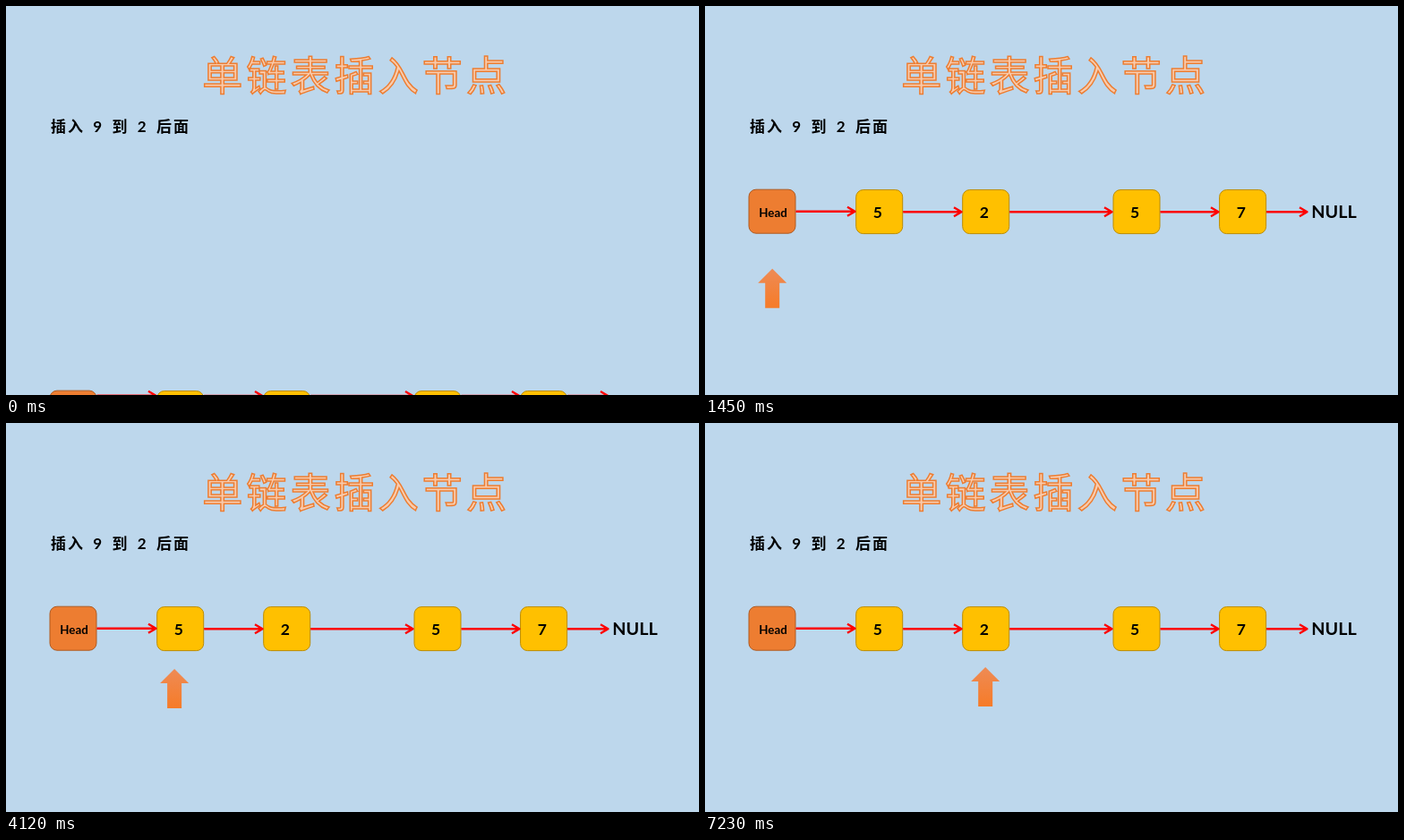
These frames come from a looping animation (774 by 435 pixels, 8 s). An HTML page:

```html
<!DOCTYPE html>
<html lang="zh-CN">
<head>
<meta charset="utf-8">
<style>
  html, body { margin: 0; height: 100%; overflow: hidden; background: #bdd7ec; }
  svg { display: block; width: 100vw; height: 100vh; }
  text { font-family: Lato, "Noto Sans CJK SC", "Noto Sans CJK", sans-serif; font-weight: 700; }
  .title { font-size: 45px; font-weight: 400; letter-spacing: 4.1px; fill: #f8cbad; stroke: #ed7d31; stroke-width: 1.5px; }
  .task { font-size: 17px; letter-spacing: 2px; word-spacing: 3.2px; }
  .boxes rect { fill: #ffc000; stroke: #bc8c00; }
  .boxes .head { fill: #ed7d31; stroke: #ae5a21; }
  .links { fill: none; stroke: #f00; stroke-width: 2.4px; stroke-linejoin: round; }
  .labels { font-size: 17.5px; text-anchor: middle; }
</style>
</head>
<body>
<svg viewBox="0 0 774 435">
  <defs>
    <linearGradient id="glow" x2="0" y2="1">
      <stop stop-color="#ee8b55"/>
      <stop offset="1" stop-color="#f67b28"/>
    </linearGradient>
  </defs>
  <text class="title" x="219.3" y="95.3">单链表插入节点</text>
  <text class="task" x="50" y="141.3">插入 9 到 2 后面</text>
  <g class="boxes"></g>
  <g class="links"></g>
  <g class="labels"></g>
  <path id="pointer" fill="url(#glow)" d="M0 0L16 16H8V44H-8V16H-16Z"/>
</svg>
<script>
const LOOP = 8000, STEP = 63;
const $ = selector => document.querySelector(selector);
const boxes = $('.boxes'), links = $('.links'), labels = $('.labels'), pointer = $('#pointer');

const nodes = [[49, 'Head'], [168.7, '5'], [287.7, '2'], [456, '5'], [574.6, '7']];
const linkEnds = [167.5, 286.5, 454.5, 573.5, 672.5];

nodes.forEach(([x, label], i) => {
  const head = i === 0, y = head ? 205.2 : 205.6, mid = y + 24.6, tip = linkEnds[i];
  boxes.innerHTML += `<rect class="${head ? 'head' : ''}" x="${x}" y="${y}" width="52" height="49" rx="8"/>`;
  links.innerHTML += `<path d="M${x + 52.5} ${mid}H${tip}M${tip - 8.5} ${mid - 5}L${tip} ${mid}L${tip - 8.5} ${mid + 5}"/>`;
  labels.innerHTML += head
    ? `<text x="76" y="236" font-size="13.3">${label}</text>`
    : `<text x="${x + 24.2}" y="236.7">${label}</text>`;
});
labels.innerHTML += '<text x="702.5" y="237.3" font-size="19.8">NULL</text>';

// Motion advances in discrete ticks counted from the start of each phase.
const ticks = (t, start) => Math.max(0, Math.floor((t - start + 14) / STEP));
const remaining = (n, rate) => Math.max(0, 0.978 - rate * n);
const shift = (el, x, y) => el.setAttribute('transform', `translate(${x} ${y})`);

function glide(t, firstTick, start, duration) {
  const now = firstTick + ticks(t, firstTick) * STEP;
  const u = t < firstTick - 14 ? 0 : Math.min(1, Math.max(0, (now - start) / duration));
  return (1 - Math.cos(Math.PI * u)) / 2;
}

function draw(t) {
  // Each kind of shape flies in from just below the stage, so travel differs.
  const left = remaining(ticks(t, 50 - STEP), 0.1425);
  shift(boxes, 0, 230 * left);
  shift(links, 0, 210.5 * left);
  shift(labels, 0, 221 * left);

  const toFirst = glide(t, 2260, 2090, 2030);
  const toSecond = glide(t, 5200, 5285, 1945);
  const drop = 160 * remaining(ticks(t, 1010), 0.123);
  pointer.style.display = t < 1010 ? 'none' : '';
  shift(pointer, 75.2 + 113 * toFirst + 125 * toSecond, 275 + drop - 2 * toSecond);
}

function frame() {
  draw(performance.now() % LOOP);
  requestAnimationFrame(frame);
}
frame();
</script>
</body>
</html>
```
